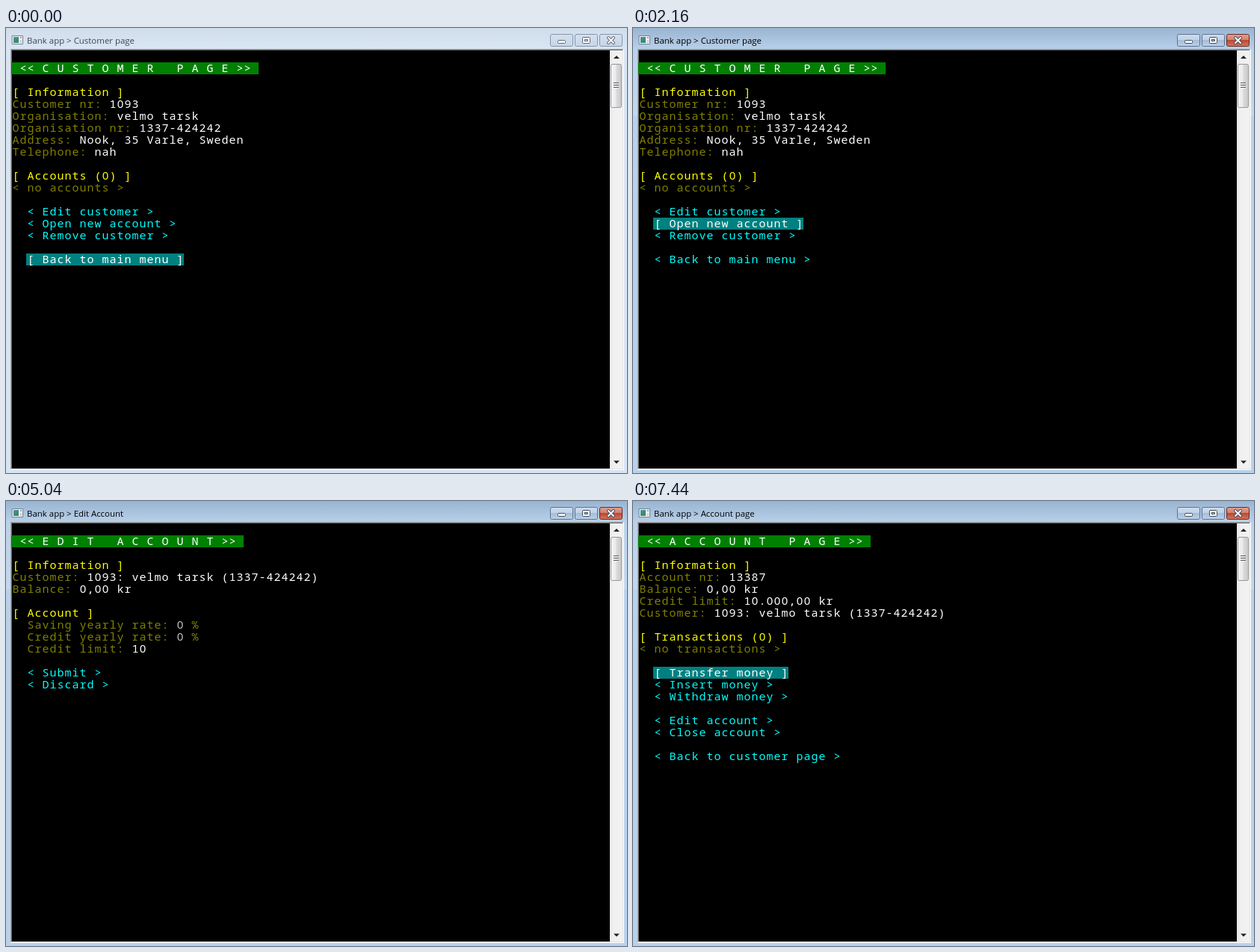
These frames come from a looping animation (831x596 px, 8 s). An HTML page with a canvas:

```html
<!DOCTYPE html>
<html lang="en">
<head>
<meta charset="utf-8">
<title>Bank app</title>
<style>
html, body { margin: 0; width: 100%; height: 100%; overflow: hidden; background: #b9d1ea; }
canvas { display: block; }
</style>
</head>
<body>
<canvas id="stage" width="831" height="596"></canvas>
<script>
const g = document.getElementById('stage').getContext('2d');
const LOOP = 8000, CELL = 10, LINE = 16, LEFT = 8, TOP = 30;
const MONO = '15px "Noto Sans Mono", "DejaVu Sans Mono", monospace';
const ZERO = '15px "Noto Sans", "Open Sans", sans-serif';
const OLIVE = '#808000', YELLOW = '#ffff00', CYAN = '#00ffff', WHITE = '#ffffff',
      SILVER = '#c0c0c0', TEAL = '#008080', GREEN = '#008000';
const ORG = 'velmo tarsk', ORG_NR = '1337-424242';

function rect(x, y, w, h, fill) {
  g.fillStyle = fill;
  g.fillRect(x, y, w, h);
}

function box(x, y, w, h, r, fill, line) {
  g.beginPath();
  g.roundRect(x + .5, y + .5, w - 1, h - 1, r);
  g.fillStyle = fill;
  g.fill();
  g.lineWidth = 1;
  g.strokeStyle = line;
  g.stroke();
}

// stops: offset, colour, offset, colour ...
function ramp(x0, y0, x1, y1, ...stops) {
  const r = g.createLinearGradient(x0, y0, x1, y1);
  for (let i = 0; i < stops.length; i += 2) r.addColorStop(stops[i], stops[i + 1]);
  return r;
}

function poly(fill, ...p) {
  g.beginPath();
  for (let i = 0; i < p.length; i += 2) g.lineTo(p[i], p[i + 1]);
  g.closePath();
  g.fillStyle = fill;
  g.fill();
}

// Text on the console grid; zeros are drawn without a slash.
function put(col, row, text, color) {
  g.fillStyle = color;
  g.textAlign = 'center';
  [...text].forEach((ch, i) => {
    if (ch === ' ') return;
    g.font = ch === '0' ? ZERO : MONO;
    g.fillText(ch, LEFT + (col + i + .5) * CELL, TOP + row * LINE + 13);
  });
}

function heading(words) {
  const text = ` << ${[...words].join(' ')} >> `;
  rect(7, TOP + LINE, text.length * CELL + 1, LINE, GREEN);
  put(0, 1, text, WHITE);
}

const section = (row, name) => put(0, row, `[ ${name} ]`, YELLOW);

function field(row, label, value, col = 0, color = WHITE) {
  put(col, row, label + ':', OLIVE);
  put(col + label.length + 2, row, value, color);
}

function item(row, label, on) {
  const text = on ? `[ ${label} ]` : `< ${label} >`;
  if (on) rect(27, TOP + row * LINE, text.length * CELL + 1, LINE, TEAL);
  put(2, row, text, on ? WHITE : CYAN);
}

const cursor = (col, row) => rect(LEFT + col * CELL, TOP + row * LINE + 12, CELL, 4, WHITE);

function customerPage(t) {
  const pick = t < 1500 ? 17 : t < 2160 ? 15 : 14;
  heading('CUSTOMER PAGE');
  section(3, 'Information');
  field(4, 'Customer nr', '1093');
  field(5, 'Organisation', ORG);
  field(6, 'Organisation nr', ORG_NR);
  field(7, 'Address', 'Nook, 35 Varle, Sweden');
  field(8, 'Telephone', 'nah');
  section(10, 'Accounts (0)');
  put(0, 11, '< no accounts >', OLIVE);
  item(13, 'Edit customer', pick === 13);
  item(14, 'Open new account', pick === 14);
  item(15, 'Remove customer', pick === 15);
  item(17, 'Back to main menu', pick === 17);
}

function limitText(t) {
  if (t < 4680) return '0';
  const keys = [4980, 5040, 5580, 6060, 6420].filter(k => t >= k).length;
  return '10000'.slice(0, keys);
}

function editPage(t) {
  heading('EDIT ACCOUNT');
  section(3, 'Information');
  field(4, 'Customer', `1093: ${ORG} (${ORG_NR})`);
  field(5, 'Balance', '0,00 kr');
  if (t < 2820) return;
  section(7, 'Account');
  if (t >= 4680 && t < 4740) return;

  const focus = t < 3660 ? 8 : t < 3960 ? 9 : t < 6960 ? 10 : 12;
  const tint = row => row === focus ? WHITE : SILVER;
  const limit = limitText(t);
  field(8, 'Saving yearly rate', '0', 2, tint(8));
  field(9, 'Credit yearly rate', '0', 2, tint(9));
  put(24, 8, '%', OLIVE);
  put(24, 9, '%', OLIVE);
  field(10, 'Credit limit', limit, 2, tint(10));
  item(12, 'Submit', focus === 12);
  item(13, 'Discard', false);

  const during = (a, b) => t >= a && t < b;
  if (during(3000, 3480)) cursor(23, 8);
  if (during(4020, 4500) || during(5520, 5580) || during(6000, 6420) || during(6540, 6960))
    cursor(16 + limit.length, 10);
}

function accountPage(t) {
  heading('ACCOUNT PAGE');
  section(3, 'Information');
  field(4, 'Account nr', '13387');
  field(5, 'Balance', '0,00 kr');
  field(6, 'Credit limit', '10.000,00 kr');
  field(7, 'Customer', `1093: ${ORG} (${ORG_NR})`);
  if (t < 7440) return;
  section(9, 'Transactions (0)');
  put(0, 10, '< no transactions >', OLIVE);
  item(12, 'Transfer money', true);
  item(13, 'Insert money');
  item(14, 'Withdraw money');
  item(16, 'Edit account');
  item(17, 'Close account');
  item(19, 'Back to customer page');
}

function buttons(active) {
  const line = active ? '#5d7391' : '#8795aa', ink = active ? '#414b5c' : '#5f6773';
  const face = active
    ? ramp(0, 8, 0, 25, 0, '#cfdeee', .48, '#bfd2e7', .5, '#a5bdd8', 1, '#bdd2e8')
    : ramp(0, 8, 0, 25, 0, '#d5e1ef', 1, '#c5d5e8');
  const red = ramp(0, 8, 0, 25, 0, '#e2a294', .48, '#d27f6e', .5, '#be4731', 1, '#d27a60');
  box(728, 8, 31, 17, 2, face, line);
  box(761, 8, 31, 17, 2, face, line);
  box(794, 8, 31, 17, 2, active ? red : face, active ? '#6b2a24' : line);

  box(738, 16, 11, 5, 1, WHITE, ink);
  box(771, 12, 11, 9, 1, WHITE, ink);
  box(774, 15, 5, 3, 0, active ? '#a9c0da' : '#ccdaea', ink);
  g.lineCap = 'round';
  for (const [w, c] of [[3.9, ink], [2, WHITE]]) {
    g.lineWidth = w;
    g.strokeStyle = c;
    g.beginPath();
    g.moveTo(806, 13); g.lineTo(813, 20);
    g.moveTo(813, 13); g.lineTo(806, 20);
    g.stroke();
  }
}

function scrollbar() {
  rect(808, 30, 17, 560, ramp(808, 0, 825, 0, 0, '#e8e8e8', .3, '#f0f0f0', 1, '#f2f2f2'));
  poly('#222', 813, 41, 817, 37, 821, 41);
  poly('#222', 813, 579.5, 821, 579.5, 817, 583.5);
  box(809, 48, 15, 59, 2,
    ramp(809, 0, 824, 0, 0, '#f6f6f6', .48, '#e9e9eb', .52, '#d9dadc', 1, '#c7c8cb'), '#979797');
  for (let y = 73; y < 80; y += 3) {
    rect(813, y, 7, 1, '#555');
    rect(813, y + 1, 7, 1, '#f5f5f5');
  }
}

function sunkenEdge() {
  rect(6, 28, 821, 564, '#fff');
  rect(6, 28, 820, 563, '#a0a0a0');
  rect(7, 29, 819, 562, '#e3e3e3');
  rect(7, 29, 818, 561, '#696969');
  rect(8, 30, 800, 560, '#000');
}

function chrome(title, active) {
  rect(0, 0, 831, 596, active ? '#b9d1ea' : '#d7e4f2');
  if (active) rect(0, 28, 831, 90, ramp(0, 28, 0, 118, 0, '#b9d1ea', 1, '#c3d8ee'));
  rect(0, 0, 831, 29, active
    ? ramp(0, 0, 0, 29, 0, '#99b4d1', 1, '#b9d1ea')
    : ramp(0, 0, 0, 29, 0, '#d0ddeb', 1, '#dae6f3'));

  box(8, 10, 15, 12, 0, '#f7f9fb', '#76808c');
  rect(10, 12, 7, 8, ramp(10, 12, 17, 20, 0, '#4f8fa8', 1, '#2f8a5c'));
  rect(19, 12, 2, 2, '#8fa0b0');
  rect(19, 16, 2, 4, '#c4ccd4');

  g.font = '11.45px "Open Sans", "Noto Sans", sans-serif';
  g.textAlign = 'left';
  g.fillStyle = active ? '#000' : '#3f4852';
  g.fillText(title, 28, 21);
  buttons(active);
  sunkenEdge();
  scrollbar();
}

function draw(t) {
  const [name, page] = t < 2760 ? ['Customer page', customerPage]
    : t < 7380 ? ['Edit Account', editPage]
    : ['Account page', accountPage];
  chrome('Bank app > ' + name, t >= 960);
  page(t);
}

const start = performance.now();
function tick() {
  draw((performance.now() - start) % LOOP);
  requestAnimationFrame(tick);
}
tick();
</script>
</body>
</html>
```
